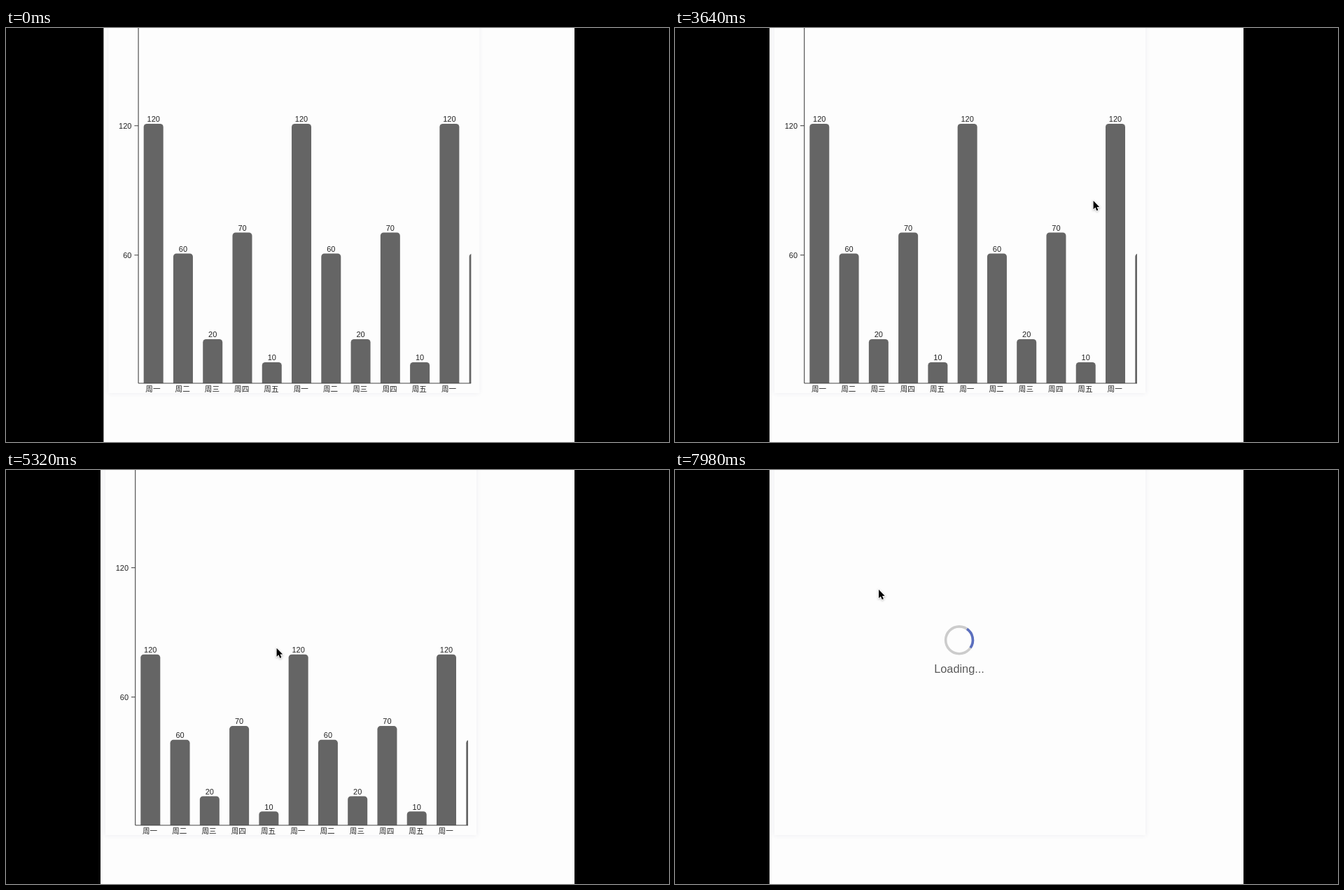
Write an HTML page with a canvas that moves like this. It is 947 by 592 pixels and loops after 8000 ms.

```html
<!DOCTYPE html>
<html lang="zh">
<head>
<meta charset="utf-8">
<style>
  html, body { margin: 0; width: 100%; height: 100%; overflow: hidden; background: #000; }
  canvas { display: block; }
</style>
</head>
<body>
<canvas width="947" height="592"></canvas>
<script>
const ctx = document.querySelector('canvas').getContext('2d');
const LOOP = 8000;
const FONT = '"Liberation Sans", "Noto Sans CJK SC", "Noto Sans CJK", sans-serif';
const DAYS = ['一', '二', '三', '四', '五'];
const VALUES = [120, 60, 20, 70, 10];
const HEIGHTS = [371, 185.5, 63, 215.5, 30];
const BASE = 508, AXIS_X = 184.7, RIGHT = 660, PITCH = 42.27, BAR = 28;

// Each reload shows the spinner from start to end, then the bars grow.
const RELOADS = [
  { start: 1410, end: 2600 },
  { start: 3862, end: 5050 },
  { start: 7004, end: 9000 }
];
const GROW_MS = 900, SPIN_MS = 800;

// Pointer path: time, x, y
const POINTER = [
  [840, 789, 345], [960, 789, 345], [1660, 752, 332], [2500, 645, 270],
  [3300, 598, 247], [4180, 597, 247], [5040, 437, 252.5], [5620, 333, 257],
  [6500, 304, 180], [6840, 304, 180], [7540, 293, 172], [8000, 291, 171]
];

function text(str, x, y, size, align = 'center', color = '#222') {
  ctx.font = `${size}px ${FONT}`;
  ctx.textAlign = align;
  ctx.textBaseline = 'alphabetic';
  ctx.fillStyle = color;
  ctx.fillText(str, x, y);
}

function line(x1, y1, x2, y2) {
  ctx.beginPath();
  ctx.moveTo(x1, y1);
  ctx.lineTo(x2, y2);
  ctx.stroke();
}

function drawPage() {
  ctx.fillStyle = '#fdfdfd';
  ctx.fillRect(135, 0, 700, 592);
  ctx.save();
  ctx.shadowColor = 'rgba(60, 60, 100, .09)';
  ctx.shadowBlur = 7;
  ctx.fillRect(142, -20, 530, 542);
  ctx.restore();
}

function drawChart(growth) {
  ctx.save();
  ctx.beginPath();
  ctx.rect(135, 0, RIGHT - 135, 592);
  ctx.clip();
  for (let i = 0; i < 12; i++) {
    const k = i % 5, x = 192.3 + i * PITCH, height = HEIGHTS[k] * growth;
    ctx.fillStyle = '#656565';
    ctx.beginPath();
    ctx.roundRect(x, BASE - height, BAR, height, [4.5, 4.5, 0, 0]);
    ctx.fill();
    if (i > 10) continue;
    text(VALUES[k], x + BAR / 2, BASE - height - 2.6, 11);
    text('周' + DAYS[k], x + BAR / 2 - 0.8, 520, 10.6);
  }
  ctx.strokeStyle = '#444';
  ctx.lineWidth = 1.1;
  line(AXIS_X, 0, AXIS_X, BASE);
  line(AXIS_X, BASE, RIGHT, BASE);
  for (const [value, y] of [[120, 139.7], [60, 324.7]]) {
    line(179, y, AXIS_X, y);
    text(value, 175, y + 3.8, 11, 'right');
  }
  ctx.restore();
}

function drawLoading(elapsed) {
  const angle = elapsed / SPIN_MS * 2 * Math.PI - Math.PI / 2;
  const arc = (from, to, color) => {
    ctx.strokeStyle = color;
    ctx.beginPath();
    ctx.arc(406, 243.3, 19.4, from, to);
    ctx.stroke();
  };
  ctx.lineWidth = 3.6;
  arc(0, 2 * Math.PI, '#ccc');
  arc(angle - Math.PI / 4, angle + Math.PI / 4, '#5b6fbf');
  text('Loading...', 406, 290.3, 16.3, 'center', '#5a5a5a');
}

function drawPointer(t) {
  if (t < POINTER[0][0]) return;
  const next = POINTER.findIndex(p => p[0] > t);
  const [t0, x0, y0] = POINTER[next - 1], [t1, x1, y1] = POINTER[next];
  const k = (t - t0) / (t1 - t0);
  ctx.save();
  ctx.translate(x0 + (x1 - x0) * k, y0 + (y1 - y0) * k);
  const arrow = new Path2D('M0 0V12.2L2.8 9.6L4.7 14.2L6.8 13.3L4.9 8.9H8.6Z');
  ctx.shadowColor = 'rgba(0, 0, 0, .3)';
  ctx.shadowBlur = 3;
  ctx.shadowOffsetY = 1;
  ctx.strokeStyle = '#fff';
  ctx.lineWidth = 1.6;
  ctx.stroke(arrow);
  ctx.shadowColor = 'transparent';
  ctx.fillStyle = '#000';
  ctx.fill(arrow);
  ctx.restore();
}

function draw(t) {
  ctx.fillStyle = '#000';
  ctx.fillRect(0, 0, 947, 592);
  ctx.save();
  ctx.beginPath();
  ctx.rect(0, 0, 812, 592);
  ctx.clip();
  // The page settles back from a sideways overscroll.
  ctx.translate(t < 820 ? 4.4 * (1 - t / 820) ** 3 : 0, 0);
  drawPage();
  const reload = RELOADS.findLast(r => t >= r.start);
  if (reload && t < reload.end) {
    drawLoading(t - reload.start);
  } else {
    const p = reload ? Math.min(1, (t - reload.end) / GROW_MS) : 1;
    drawChart(1 - (1 - p) ** 3);
  }
  ctx.restore();
  drawPointer(t);
}

function frame() {
  draw(performance.now() % LOOP);
  requestAnimationFrame(frame);
}
frame();
</script>
</body>
</html>
```
